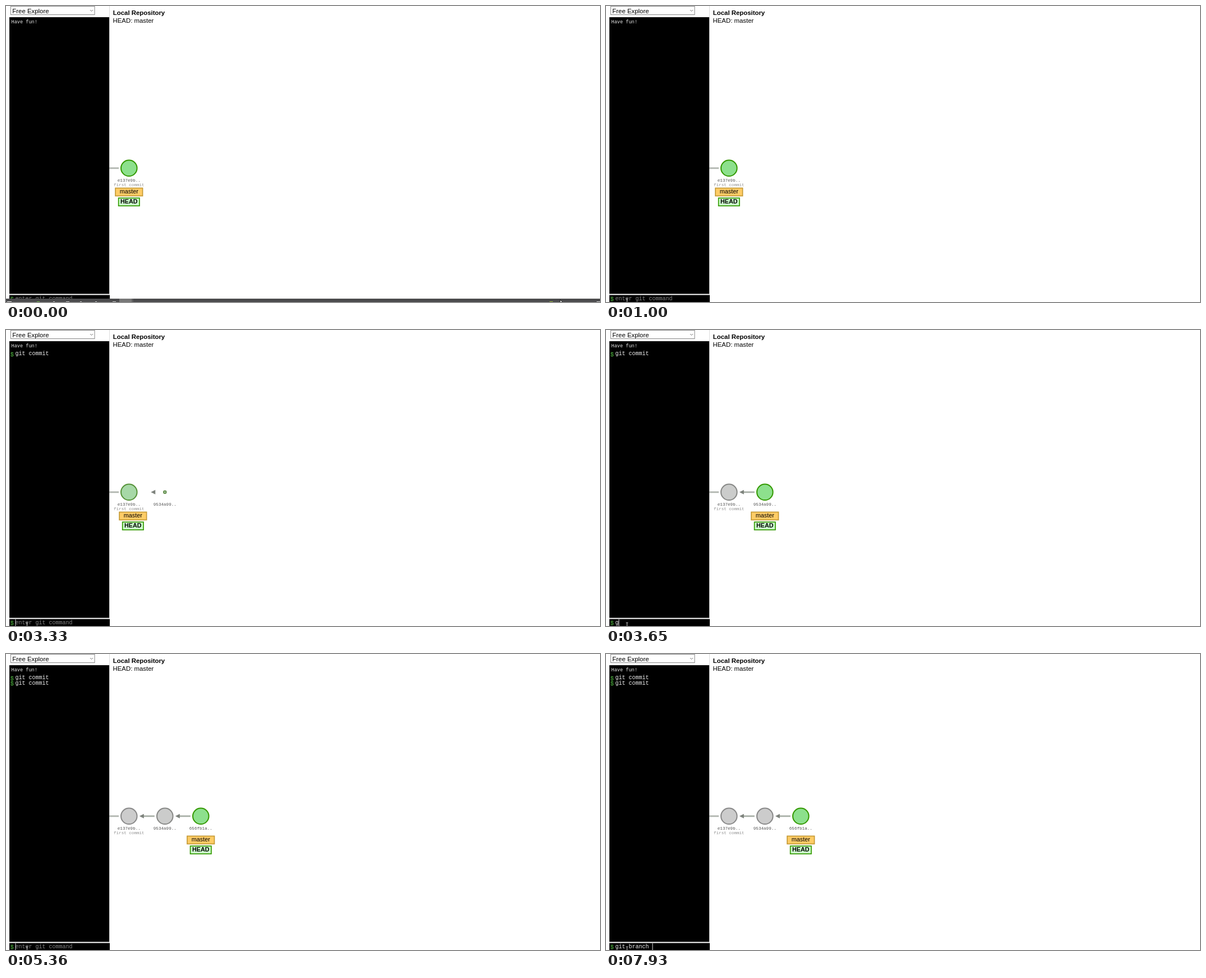
Recreate the animation shown at these times as an HTML page with a canvas. Size 1059 px wide and 529 px high, loop 8000 ms.

```html
<!DOCTYPE html>
<html lang="en">
<head>
<meta charset="utf-8">
<title>Commit graph</title>
<style>
html, body { margin: 0; width: 100%; height: 100%; overflow: hidden; background: #fff; }
canvas { display: block; }
</style>
</head>
<body>
<canvas id="stage" width="1059" height="529"></canvas>
<script>
const ctx = document.getElementById('stage').getContext('2d');
const LOOP = 8000, W = 1059, H = 529;
const SANS = '"Liberation Sans", Arial, sans-serif';
const MONO = '"Liberation Mono", "Courier New", monospace';
const GREEN = [140, 224, 140], GREEN_EDGE = [51, 153, 0];
const GREY = [204, 204, 204], GREY_EDGE = [136, 136, 136];
const COMMITS = [
  { id: 'e137e9b..', note: 'first commit', at: -1000 },
  { id: '9534a99..', at: 3180 },
  { id: '656fb1a..', at: 4890 }
];
const GROW = 500;

// Every change of the prompt: time, text after it
const keys = [[1150, '']];
function type(text, times) {
  times.forEach((t, i) => keys.push([t, text.slice(0, i + 1)]));
}
type('git commit', [1800, 1950, 2080, 2160, 2390, 2480, 2550, 2700, 2840, 2920]);
keys.push([3180, '']);
type('git commit', [3570, 3720, 3870, 3950, 4120, 4200, 4350, 4500, 4580, 4660]);
keys.push([4890, '']);
type('git c', [5590, 5690, 5790, 5870, 5940]);
keys.push([6830, 'git ']);
[7000, 7170, 7320, 7470, 7700, 7850, 7930].forEach((t, i) =>
  keys.push([t, 'git branch '.slice(0, 5 + i)]));

const clamp = v => Math.max(0, Math.min(1, v));
const lerp = (a, b, p) => a + (b - a) * p;
const cubic = p => p < 0.5 ? 4 * p ** 3 : 1 - 4 * (1 - p) ** 3;
const mix = (a, b, p) => `rgb(${a.map((v, i) => Math.round(lerp(v, b[i], p)))})`;

function rect(x, y, w, h, fill) {
  ctx.fillStyle = fill;
  ctx.fillRect(x, y, w, h);
}

function label(text, x, y, font, fill, align = 'left') {
  ctx.font = font;
  ctx.fillStyle = fill;
  ctx.textAlign = align;
  ctx.fillText(text, x, y);
}

function path(points, close) {
  ctx.beginPath();
  points.forEach(p => ctx.lineTo(...p));
  if (close) ctx.closePath();
}

function stroke(color, width) {
  ctx.strokeStyle = color;
  ctx.lineWidth = width;
  ctx.stroke();
}

function tag(text, x, y, w, fill, edge, weight) {
  rect(x - w / 2, y, w, 14, fill);
  ctx.strokeStyle = edge;
  ctx.lineWidth = 1.7;
  ctx.strokeRect(x - w / 2, y, w, 14);
  label(text, x, y + 10, `${weight} 10.8px ${SANS}`, '#000', 'center');
}

function page() {
  rect(0, 0, W, H, '#fff');
  rect(184, 0, 1, 515, '#ddd');
  ctx.strokeStyle = '#868686';
  ctx.lineWidth = 1;
  ctx.strokeRect(8.5, 0.5, 149.5, 15);
  label('Free Explore', 11.3, 12.5, `11.4px ${SANS}`, '#000');
  path([[150, 7], [152.5, 9.5], [155, 7]]);
  stroke('#777', 1);
  label('Local Repository', 190.8, 16, `bold 11.4px ${SANS}`, '#000');
  label('HEAD: master', 190.5, 30, `11.4px ${SANS}`, '#000');
  rect(6, 20, 178, 494.5, '#000');
  rect(6, 516.5, 179, 13, '#000');
  label('Have fun!', 9.5, 30.5, `8.6px ${MONO}`, '#e4e4e4');
}

function prompt(y) {
  label('$', 7.6, y, `11px ${MONO}`, '#4db33d');
}

function terminal(t) {
  COMMITS.slice(1).forEach((c, i) => {
    if (t < c.at) return;
    prompt(46.5 + i * 9.7);
    label('git commit', 16.5, 45 + i * 9.6, `10px ${MONO}`, '#eee');
  });
  prompt(526.5);
  const [since, text] = keys.filter(k => k[0] <= t).pop() || [null, ''];
  label(text || 'enter git command', 16.5, 526, `10px ${MONO}`, text ? '#eee' : '#858585');
  if (since !== null && (t - since) % 1060 < 530) {
    rect(16.5 + 6 * text.length, 517, 1, 12, '#ddd');
  }
}

function graph(t) {
  let head = 219.3;
  path([[184, 289.8], [201, 289.8]]);
  stroke('#b1b6b0', 2.8);
  COMMITS.forEach((c, i) => {
    const raw = clamp((t - c.at) / GROW);
    if (t < c.at) return;
    const x = 219.3 + 64 * i, p = cubic(raw);
    if (i) {
      const tip = lerp(x - 22.5, x - 45.5, p);
      if (tip + 8 < x - 18.5) {
        path([[x - 18.5, 289.8], [tip + 7, 289.8]]);
        stroke('#a9b0a7', 2.8);
      }
      path([[tip, 289.8], [tip + 8, 285.8], [tip + 8, 293.8]], true);
      ctx.fillStyle = '#7d827c';
      ctx.fill();
      head = lerp(head, x, p);
    }
    const next = COMMITS[i + 1];
    const fade = q => 1 - (1 - clamp(q)) ** 1.5;
    const grey = next && t >= next.at ? fade((t - next.at) / GROW) : 1 - fade(raw);
    ctx.beginPath();
    ctx.arc(x, 289.8, lerp(0.8, 14.3, p), 0, 7);
    ctx.fillStyle = mix(GREEN, GREY, grey);
    ctx.fill();
    stroke(mix(GREEN_EDGE, GREY_EDGE, grey), 2);
    label(c.id, x, 314, `7.6px ${MONO}`, '#555', 'center');
    if (c.note) label(c.note, x, 321.5, `7.6px ${MONO}`, '#909090', 'center');
  });
  tag('master', head, 325.4, 48.5, '#fc6', '#c59a35', 'normal');
  tag('HEAD', head, 343.2, 37.3, '#cfc', '#390', 'bold');
}

function taskbar(t) {
  const top = 523 + 6 * clamp((t - 450) / 100);
  if (top >= H) return;
  rect(0, top, W, 6, '#4b4b4d');
  rect(202, top, 22, 6, '#777');
  rect(224, top, 3, 6, '#5d5d5f');
  rect(2, top + 5, 8, 1, '#eee');
  rect(55, top + 5, 5, 1, '#6dbb45');
  [84, 107, 132, 159, 190].forEach(x => rect(x, top + 5, x % 3 ? 6 : 3, 1, '#ccc'));
  rect(969, top + 5, 6, 1, '#9bbb3c');
  rect(1053, top + 5, 6, 1, '#ddd');
}

function pointer(t) {
  const p = clamp((t - 70) / 860), e = p * p * (3 - 2 * p);
  const x = lerp(988, 37, e), y = 525 - 97 * Math.sin(Math.PI * e);
  if (x < 185 && y > 516) {
    path([[x - 1.5, y - 2], [x + 2.5, y - 2]]);
    stroke('#aaa', 1);
    path([[x + 0.5, y - 2], [x + 0.5, y + 8]]);
    stroke('#ccc', 1);
    return;
  }
  path([[0, 0], [0, 12], [2.8, 9.4], [4.6, 13.4], [6.2, 12.6], [4.5, 8.8], [8.3, 8.5]]
    .map(q => [x + q[0], y + q[1]]), true);
  ctx.fillStyle = '#fff';
  ctx.fill();
  stroke('#000', 0.8);
}

function frame(now) {
  const t = now % LOOP;
  page();
  terminal(t);
  graph(t);
  taskbar(t);
  pointer(t);
  requestAnimationFrame(frame);
}
requestAnimationFrame(frame);
</script>
</body>
</html>
```
